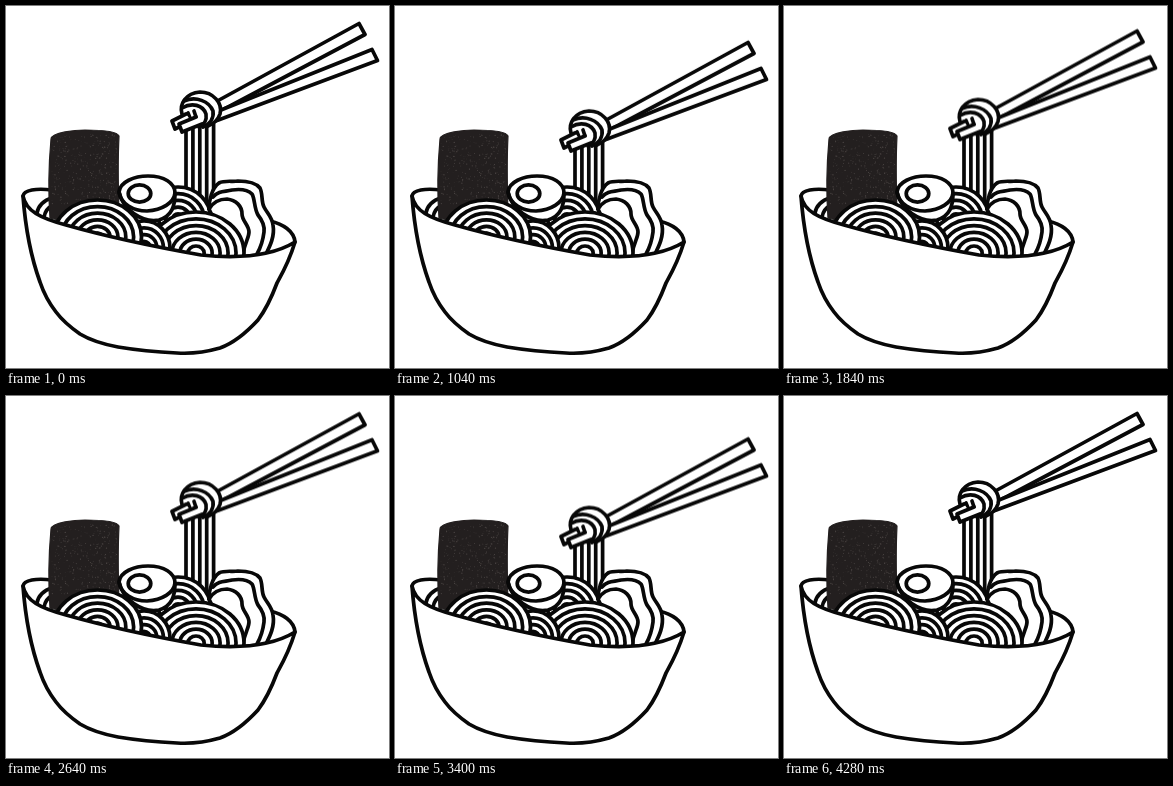
Recreate the animation shown at these times as an HTML page. Size 383 px wide and 362 px high, loop 6.44 s.

```html
<!DOCTYPE html>
<html lang="en">
<head>
<meta charset="utf-8">
<title>Noodle bowl</title>
<style>
  html, body { margin: 0; width: 100%; height: 100%; overflow: hidden; background: #fff; }
  svg { display: block; width: 100%; height: 100%; }
  .ink { fill: #fff; stroke: #080808; stroke-width: 3.7; stroke-linecap: round; stroke-linejoin: round; }
  .line { fill: none; }
</style>
</head>
<body>
<svg viewBox="0 0 383 362">
  <defs>
    <clipPath id="aboveBowl"><path d="M150 0H230V204H150Z"/></clipPath>
  </defs>
  <g class="ink">
    <!-- back rim and loose noodles -->
    <path class="line" d="M17 190C18 184 30 182 46 184M264 215C277 218 288 225 289 236"/>
    <path class="line" d="M31 207C32 200 38 194 46 192M38 211C39 206 41 202 46 200"/>

    <g clip-path="url(#aboveBowl)">
      <g class="lift" id="strands"></g>
    </g>

    <g id="backMound"></g>

    <!-- meat slice -->
    <path d="M203 203C203 194 206 182 213 177C219 174 226 176 232 175C241 175 250 177 254 182C257 188 255 195 258 201C261 207 266 211 267 219C269 230 264 240 260 248L226 252Z"/>
    <path class="line" d="M207 191C213 184 219 186 226 184C233 183 241 183 246 188C249 193 248 202 252 209C256 214 259 219 258 226C257 234 255 241 251 248"/>
    <path class="line" d="M203 203C206 198 212 193 221 193C230 194 236 200 236 208C236 215 243 219 243 226C243 232 239 236 237 248"/>

    <!-- seaweed sheet -->
    <path d="M45 133C46 126 70 124 79 124C95 124 111 125 113 130C112 150 112 175 113 205L85 222L44 212C42 185 43 155 45 133Z" style="fill:#231f1f;stroke:#231f1f;stroke-width:1.2"/>
    <g id="grain" stroke="none" fill="#5a5452"></g>

    <!-- egg -->
    <path d="M113 186C114 176 128 170 142 170C158 170 169 177 169 187C169 200 166 210 153 214C136 217 117 204 113 186Z"/>
    <path class="line" d="M113 186C115 198 127 205 141 205C156 204 168 197 169 187"/>
    <ellipse cx="133.5" cy="187.5" rx="11.3" ry="8.6"/>

    <g id="frontMounds"></g>

    <!-- bowl -->
    <path d="M17 190C20 205 34 212 60 219C95 229 150 241 195 249C235 253 268 249 289 236C283 256 276 268 271 277C265 293 258 306 252 314C240 327 228 337 214 342C200 346 186 348 171 347C150 346 130 344 112 341C96 338 84 334 74 328C64 321 56 314 50 306C43 297 37 285 34 276C26 254 20 230 17 190Z"/>

    <g class="lift">
      <!-- chopsticks -->
      <path d="M204 99L353 17.5L359 28.5L208 108.5Z"/>
      <path d="M200 110L366 43.5L371.5 54.5L203 117.5Z"/>
      <!-- wrapped noodles -->
      <path d="M176 108C173 98 180 87 194 86C207 86 217 97 214 108C212 114 207 118 202 120L180 121Z" stroke="none"/>
      <path class="line" d="M176 108C173 98 180 87 194 86C207 86 217 97 214 108C212 114 207 118 202 120"/>
      <path class="line" d="M178 95C190 90 203 95 207 105C208 112 204 118 197 121"/>
      <path class="line" d="M176 102C186 96 197 99 200 108C201 114 198 119 193 121"/>
      <path class="line" d="M182 107L184 112M188 105L190 111"/>
      <!-- tips -->
      <path d="M180 108L166 115L169 123L185 115"/>
      <path d="M190 111L173 118L176 126L196 118"/>
    </g>
  </g>
</svg>
<script>
  const $ = id => document.getElementById(id);

  function add(parent, tag, attrs) {
    const el = document.createElementNS("http://www.w3.org/2000/svg", tag);
    for (const key in attrs) el.setAttribute(key, attrs[key]);
    parent.append(el);
  }

  // Concentric noodle loops, largest first
  function mound(parent, cx, cy, rx, ry, gap) {
    for (let d = 0; d < ry - 2; d += gap)
      add(parent, "ellipse", { cx, cy, rx: rx - d * rx / ry, ry: ry - d });
  }

  for (let i = 0; i < 5; i++)
    add($("strands"), "path", { d: `M${180 + i * 6.9} 108V240` });

  mound($("backMound"), 172, 213, 33, 32, 6.7);
  mound($("frontMounds"), 190, 247, 48, 41, 6.8);
  mound($("frontMounds"), 138, 242, 26, 27, 6.8);
  mound($("frontMounds"), 91.5, 231, 44, 37, 6.6);

  // Paper grain on the seaweed
  let seed = 7;
  const rand = () => (seed = seed * 16807 % 2147483647) / 2147483647;
  for (let i = 0; i < 380; i++)
    add($("grain"), "circle", {
      cx: 46 + rand() * 65, cy: 128 + rand() * 72,
      r: 0.3 + rand() * 0.35, opacity: 0.3 + rand() * 0.6
    });

  // Two dips of the chopsticks: [ms, drop in px]
  const LOOP = 6440;
  const dips = [
    [0, 0], [500, 0], [1320, 25.5], [2140, 0],
    [2580, 0], [3420, 25.5], [4260, 0], [LOOP, 0]
  ];
  const frames = dips.map(([ms, y]) => ({
    offset: ms / LOOP,
    transform: `translateY(${y}px)`,
    easing: "cubic-bezier(.37, 0, .63, 1)"
  }));
  for (const el of document.querySelectorAll(".lift"))
    el.animate(frames, { duration: LOOP, iterations: Infinity });
</script>
</body>
</html>
```
